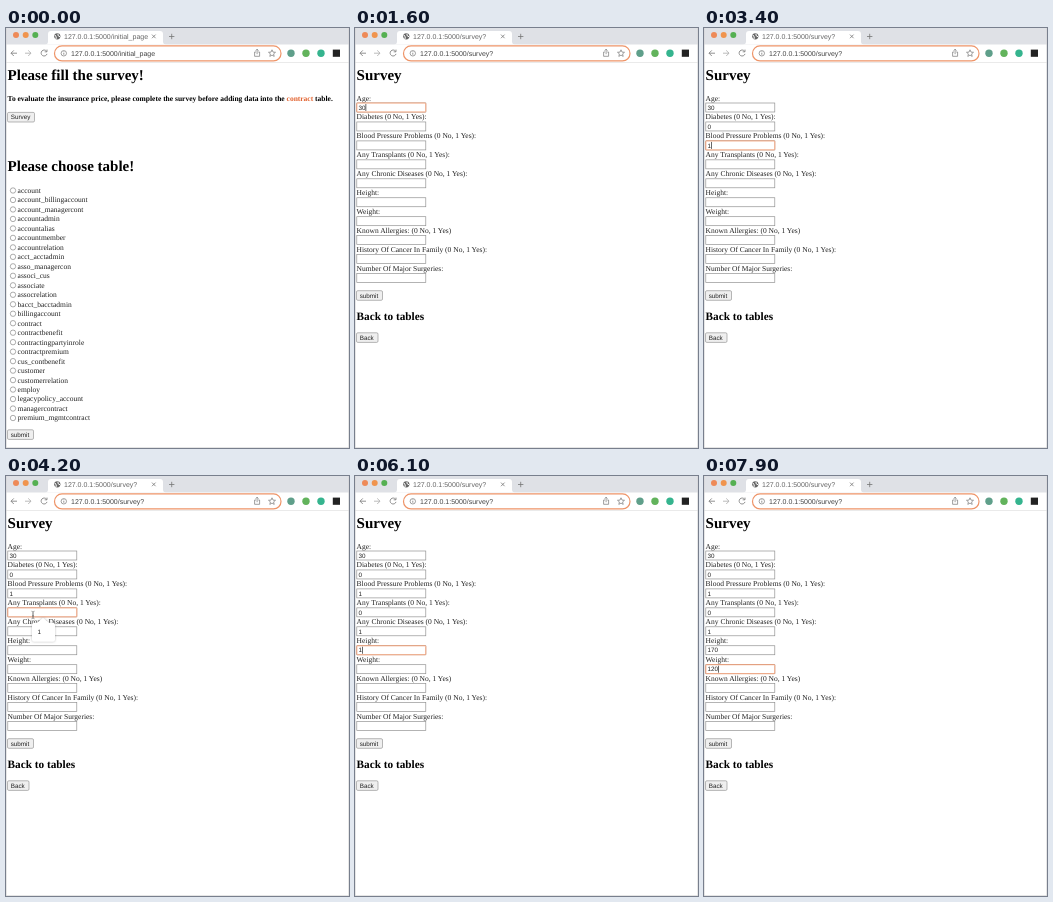
An HTML page that plays this animation: 343 px wide and 420 px high, repeating every 8 s.

```html
<!DOCTYPE html>
<html lang="en">
<head>
<meta charset="utf-8">
<title>Survey form</title>
<style>
html, body { margin: 0; width: 100%; height: 100%; overflow: hidden; background: #fff; }
svg { display: block; }
text { font: 7.5px "Liberation Serif", Times, serif; fill: #222; white-space: pre; text-rendering: geometricPrecision; }
.h1 { font-size: 15px; font-weight: bold; fill: #000; }
.h2 { font-size: 11.25px; font-weight: bold; fill: #000; }
.h4 { font-weight: bold; fill: #000; }
.ui { font: 6.3px "Liberation Sans", Arial, sans-serif; }
.bar { font: 7px "Liberation Sans", Arial, sans-serif; fill: #444; }
.tab { fill: #666; }
.line { fill: none; stroke: #777; stroke-width: .8; }
</style>
</head>
<body>
<svg id="stage" width="343" height="420" viewBox="0 0 343 420"></svg>
<script>
const ACCENT = '#ee9468';
const tables = `account account_billingaccount account_managercont accountadmin accountalias
  accountmember accountrelation acct_acctadmin asso_managercon associ_cus associate assocrelation
  bacct_bacctadmin billingaccount contract contractbenefit contractingpartyinrole contractpremium
  cus_contbenefit customer customerrelation employ legacypolicy_account managercontract
  premium_mgmtcontract`.split(/\s+/);
const labels = ['Age:', 'Diabetes (0 No, 1 Yes):', 'Blood Pressure Problems (0 No, 1 Yes):',
  'Any Transplants (0 No, 1 Yes):', 'Any Chronic Diseases (0 No, 1 Yes):', 'Height:', 'Weight:',
  'Known Allergies: (0 No, 1 Yes)', 'History Of Cancer In Family (0 No, 1 Yes):',
  'Number Of Major Surgeries:'];

// Per field: focus time, times of the key presses, value, suggestion
const entries = [
  [800, [1400, 1500], '30', '30'],
  [2000, [2500], '0', '1'],
  [3000, [3400], '1', '1'],
  [4000, [4500], '0', '1'],
  [4900, [5200], '1', ''],
  [5700, [6100, 6200, 6300], '170', '170'],
  [7200, [7500, 7600, 7700], '120', '120'],
];
// Pointer moves: start, end, from x, y, to x, y, hidden at
const moves = [
  [200, 200, 17, 90, 17, 90, 600],
  [600, 800, 17, 90, 22, 81, 1400],
  [1700, 2000, 22, 81, 24, 100, 2500],
  [2800, 3000, 24, 100, 25, 119, 3400],
  [3700, 4100, 25, 119, 27, 139, 4500],
  [4700, 4900, 27, 139, 25, 157, 5200],
  [5500, 5700, 25, 157, 23, 176, 6100],
  [6600, 7000, 23, 176, 23, 188, 7100],
  [7100, 7200, 23, 188, 23, 194, 7500],
];
const caretOff = [[2300, 2500], [4100, 4500]];

const within = (t, a, b) => t >= a && t < b;
const text = (x, y, s, cls = '') => `<text x="${x}" y="${y}" class="${cls}">${s}</text>`;
const rect = (x, y, w, h, fill, more = '') =>
  `<rect x="${x}" y="${y}" width="${w}" height="${h}" fill="${fill}" ${more}/>`;
const dot = (x, y, r, fill, more = '') => `<circle cx="${x}" cy="${y}" r="${r}" fill="${fill}" ${more}/>`;
const path = (d, more = 'class="line"') => `<path d="${d}" ${more}/>`;
const button = (y, w, s) =>
  rect(1.5, y, w, 9.6, '#efefef', 'rx="1.3" stroke="#888" stroke-width=".6"') + text(4.7, y + 6.9, s, 'ui');

const globe = dot(51.3, 8.3, 3.1, '#666') +
  path('M49 7q2 2 1 4M52 5.8q-1 2 2 3', 'fill="none" stroke="#fff" stroke-width="1"');

function chrome(address) {
  return rect(0, 0, 343, 16.5, '#dfe1e6') +
    dot(10, 7, 3, '#ee8a58') + dot(19.7, 7, 3, '#f0944e') + dot(29.3, 7, 3, '#55b052') +
    path('M39 16.5q3 0 3-3V6q0-3 3-3h109q3 0 3 3v7.5q0 3 3 3z', 'fill="#fff"') +
    globe + text(58, 10.8, address, 'bar tab') +
    path('M146 6.6l3.6 3.6m0-3.6l-3.6 3.6M163 8.5h5.4m-2.7-2.7v5.4') +
    path('M11 25.2H5m2.8-2.8L5 25.2 7.8 28') +
    path('M19 25.2h6m-2.8-2.8l2.8 2.8-2.8 2.8', 'class="line" style="stroke:#aaa"') +
    path('M40.6 23.3a3 3 0 1 0 .4 2.6M41 21.6v2.2h-2.3') +
    rect(48.5, 17.9, 226.5, 15, '#fff', `rx="7.5" stroke="${ACCENT}" stroke-width="1.2"`) +
    dot(57.8, 25.3, 2.7, 'none', 'stroke="#777" stroke-width=".7"') +
    path('M57.8 25v1.7m0-3.2v.8') + text(65, 27.8, address, 'bar') +
    path('M250 24h-1.4v4.3h5V24h-1.4M251.1 26.2v-5m-1.4 1.4l1.4-1.4 1.4 1.4', 'class="line" style="stroke-width:.7"') +
    path('M266 21.8l1 2.3 2.5.2-1.9 1.6.6 2.5-2.2-1.3-2.2 1.3.6-2.5-1.9-1.6 2.5-.2z', 'class="line" style="stroke-width:.7"') +
    dot(285, 25.2, 3.7, '#5f9f8a') + dot(300, 25.2, 3.7, '#62b35c') +
    dot(315, 25.2, 3.7, '#35b48e') + rect(326.8, 21.6, 7.2, 7.2, '#222') +
    rect(0, 34, 343, .6, '#dcdcdc');
}

const home = chrome('127.0.0.1:5000/initial_page') +
  text(1.6, 51.6, 'Please fill the survey!', 'h1') +
  text(1.6, 72.6, 'To evaluate the insurance price, please complete the survey before adding data into the ' +
    '<tspan fill="#e2622f">contract</tspan> table.', 'h4') +
  button(84.4, 27, 'Survey') +
  text(1.6, 143.1, 'Please choose table!', 'h1') +
  tables.map((name, i) => {
    const y = 162.5 + i * 9.48;
    return dot(7, y, 2.7, '#fff', 'stroke="#777" stroke-width=".6"') + text(11.6, y + 2.4, name);
  }).join('') +
  button(401.8, 26, 'submit');

const rowY = i => 75 + i * 18.95;
const form = chrome('127.0.0.1:5000/survey?') + text(1.6, 51.6, 'Survey', 'h1') +
  labels.map((s, i) => text(1.6, rowY(i) - 2.5, s) +
    rect(1.8, rowY(i), 69, 9, '#fff', 'stroke="#8c8c8c" stroke-width=".65"')).join('') +
  button(262.7, 26, 'submit') + text(1.6, 291.8, 'Back to tables', 'h2') + button(304.8, 21.5, 'Back');

function popup(i, s) {
  const y = rowY(i) + 15;
  const d = `M28 ${y}h3l6-5 6 5H47q2 0 2 2v15q0 2-2 2H28q-2 0-2-2v-15q0-2 2-2z`;
  return path(d, 'fill="#fff" style="filter:drop-shadow(0 .4px .8px #0004)"') + text(31.5, y + 11.3, s, 'ui');
}

function fields(t) {
  let out = '';
  const active = entries.filter(e => t >= e[0]).length - 1;
  entries.slice(0, active + 1).forEach(([, keys, value, hint], i) => {
    const y = rowY(i), count = keys.filter(k => t >= k).length;
    if (i === active) out += rect(1.8, y, 69, 9, '#fff', `rx=".6" stroke="${ACCENT}" stroke-width=".9"`);
    out += text(3.5, y + 6.7, value.slice(0, count), 'ui');
    if (i !== active) return;
    if (!caretOff.some(([a, b]) => within(t, a, b))) out += rect(3.6 + count * 3.5, y + 1, .6, 7, '#000');
    if (!count && hint) out += popup(i, hint);
  });
  return out;
}

function pointer(t) {
  const move = moves.find(m => within(t, m[0], m[6]));
  if (!move) return '';
  const [start, end, x0, y0, x1, y1] = move;
  const p = end > start ? Math.min(1, (t - start) / (end - start)) : 1;
  const x = x0 + (x1 - x0) * p, y = y0 + (y1 - y0) * p;
  return path(`M${x - 1.6} ${y - 3.8}q1.6 0 1.6 1.2v5.2q0 1.2-1.6 1.2m3.2 0q-1.6 0-1.6-1.2v-5.2q0-1.2 1.6-1.2m-2.6 4.6h2`,
    'fill="none" stroke="#555" stroke-width=".5"');
}

const edge = rect(.25, -1, 342.5, 420.7, 'none', 'stroke="#d4d4d4" stroke-width=".6"');
const stage = document.getElementById('stage');
let shown = -1;
function draw() {
  // The screen updates ten times a second
  const t = Math.floor(performance.now() % 8000 / 100) * 100;
  if (t !== shown) {
    stage.innerHTML = (t < 200 ? home : form + fields(t) + pointer(t)) + edge;
    shown = t;
  }
  requestAnimationFrame(draw);
}
draw();
</script>
</body>
</html>
```
